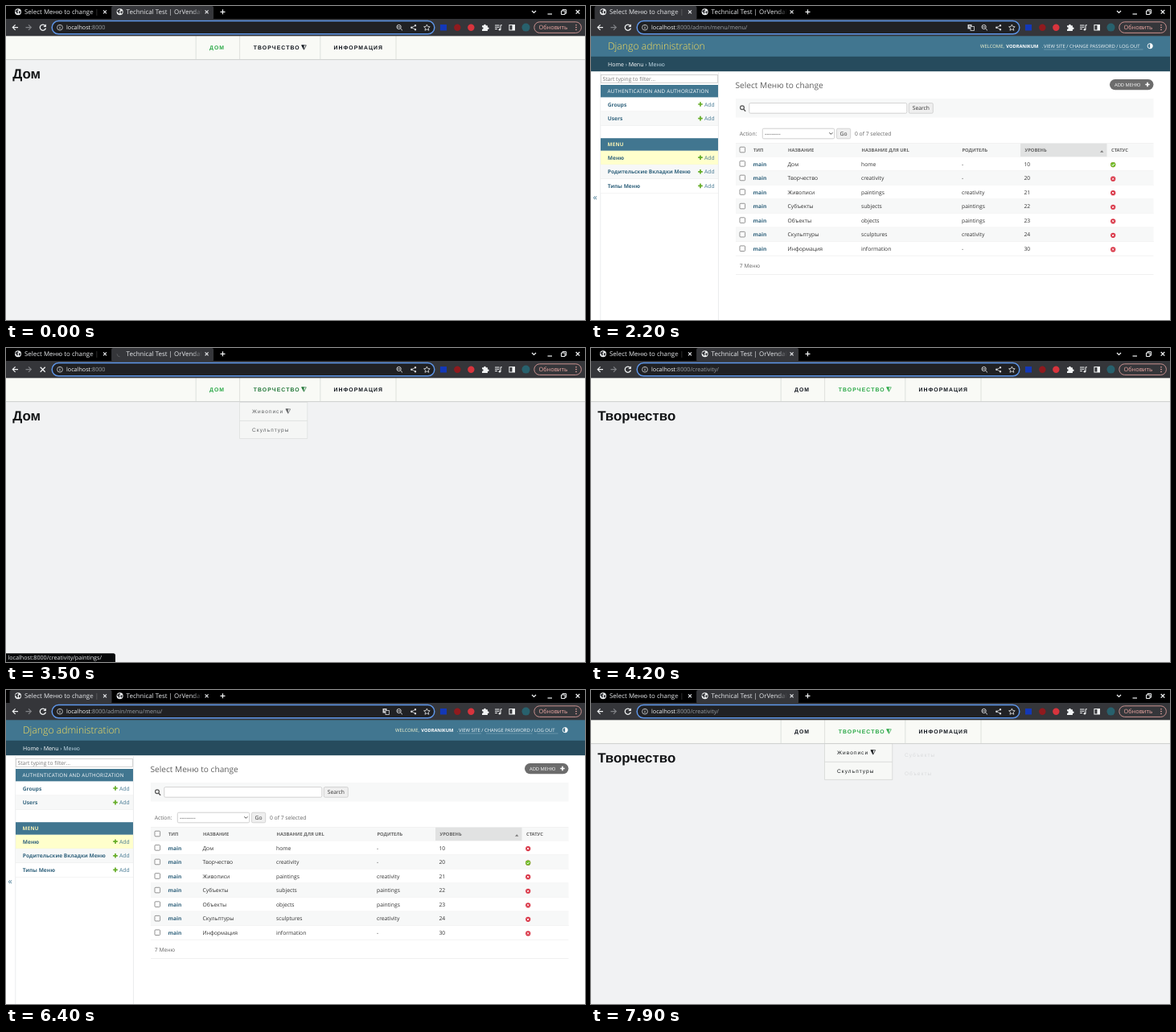
Write an HTML page that moves like this. It is 720 px wide and 390 px high and loops after 8000 ms.

```html
<!DOCTYPE html>
<html lang="ru">
<head>
<meta charset="utf-8">
<title>Menu demo</title>
<style>
html, body { margin: 0; width: 720px; height: 390px; overflow: hidden; background: #f1f2f3; }
svg { display: block; }
text { font-family: "Open Sans", "Noto Sans", sans-serif; text-rendering: geometricPrecision; white-space: pre; }
.site text { font-family: "Liberation Sans", Arial, sans-serif; }
.nav text { font-size: 6.85px; font-weight: 700; letter-spacing: 1.054px; }
.drop text { font-size: 6.5px; letter-spacing: 1.05px; }
</style>
</head>
<body>
<svg id="stage" width="720" height="390" viewBox="0 0 720 390"></svg>
<script>
const LOOP = 8000, GREEN = [40, 167, 69], INK = [15, 20, 28];
const stage = document.getElementById('stage');

const text = (x, y, size, str, fill, attrs = '') =>
  `<text x="${x}" y="${y}" font-size="${size}" fill="${fill}" ${attrs}>${str}</text>`;
const rect = (x, y, w, h, fill, attrs = '') =>
  `<rect x="${x}" y="${y}" width="${w}" height="${h}" fill="${fill}" ${attrs}/>`;
const line = (d, color, w = 1, fill = 'none') =>
  `<path d="${d}" stroke="${color}" stroke-width="${w}" fill="${fill}"/>`;
const fill = (d, color) => `<path d="${d}" fill="${color}"/>`;
const dot = (x, y, r, color, attrs = '') => `<circle cx="${x}" cy="${y}" r="${r}" fill="${color}" ${attrs}/>`;
const group = (id, body, attrs = '') => `<g id="${id}" ${attrs}>${body}</g>`;
const cross = (x, y, r, color, w) =>
  line(`M${x - r} ${y - r}l${2 * r} ${2 * r}m0 ${-2 * r}l${-2 * r} ${2 * r}`, color, w);
const plus = (x, y, r, color, w) => line(`M${x - r} ${y}h${2 * r}M${x} ${y - r}v${2 * r}`, color, w);
const BOLD = 'font-weight="700"';

// Browser window
function tab(id, x, title) {
  return `<g transform="translate(${x})">` +
    rect(4.5, 0, 127, 17, '#35363a', `id="${id}Bg" rx="2"`) +
    group(id + 'Icon', dot(15, 7.2, 4, '#f1f3f4') +
      fill('M12.2 5.2l2.6-1.2.8 1.2-1.3 1.5.8 1.2-1.2 2.2-1-2-1.6-1.3zM16 6.6l2-.4.2 2-1.6 1.6-.8-1.6z', '#35363a')) +
    group(id + 'Spin', line('M15 3.6a3.6 3.6 0 0 1 3.6 3.6', '#55575b', 1)) +
    text(23, 10, 7.95, title, '#e8eaed', 'mask="url(#fadeEnd)"') +
    cross(123, 7.3, 2, '#e8eaed', 1.1) + '</g>';
}

function chrome() {
  const icon = '#d5d7da', white = '#f1f3f4';
  return rect(0, 0, 720, 17, '#000') +
    tab('admin', 0, 'Select Меню to change | Django site admin') +
    tab('site', 126.6, 'Technical Test | OrVendal') +
    plus(269.5, 7.3, 3, white, 1.2) +
    line('M654 6l2.5 2.5L659 6', white, 1.2) + line('M673.5 10h5.5', white, 1.2) +
    line('M690.5 6h4.5v4.5h-4.5zM692 6V4.6h4.6v4.6H695', white) + cross(711, 7.3, 2.3, white, 1.3) +
    rect(0, 16, 720, 21.3, '#35363a') +
    line('M15 26.6H8.5M11.6 23.3l-3.3 3.3 3.3 3.3', white, 1.2) +
    line('M24.5 26.6H31M28 23.3l3.3 3.3-3.3 3.3', '#808286', 1.2) +
    group('reload', line('M48.7 24.4A3.6 3.6 0 1 0 49.4 27.5', white, 1.3) + fill('M49.9 22.5v3.6h-3.6z', white)) +
    group('stop', cross(45.7, 26.7, 3, white, 1.3)) +
    rect(57.2, 18.6, 475.6, 16.2, '#202124', 'rx="8.1" stroke="#5f97ea" stroke-width="1.5"') +
    dot(67, 26.7, 3.4, 'none', `stroke="${icon}" stroke-width=".8"`) + line('M67 26v2.6M67 24.5v.9', icon, .9) +
    `<text x="75" y="29.2" font-size="7.2" fill="#9aa0a6"><tspan fill="#f1f3f4">localhost</tspan><tspan id="path"></tspan></text>` +
    group('translate', rect(468.5, 23, 5, 5.5, icon) + rect(472, 25.5, 4.5, 5, '#202124', `stroke="${icon}" stroke-width=".8"`) +
      line('M470 25h2.2M471 24v3', '#202124', .6)) +
    dot(488.6, 26, 2.6, 'none', `stroke="${icon}"`) + line('M490.6 28l2.4 2.4M487.2 26h2.8', icon) +
    line('M509 24.3l-4.6 2.4 4.6 2.5', icon, .8) +
    dot(509, 24.2, 1.2, icon) + dot(504.3, 26.7, 1.2, icon) + dot(509, 29.3, 1.2, icon) +
    line('M523.4 23l1.1 2.5 2.7.3-2 1.8.6 2.7-2.4-1.4-2.4 1.4.6-2.7-2-1.8 2.7-.3z', icon, .9) +
    rect(540, 23, 8, 7.5, '#1338b8') + dot(561.3, 26.8, 4.2, '#901a1e') + dot(578.3, 26.8, 4.2, '#d8343d') +
    fill('M592 24.3h2.2a1.3 1.3 0 1 1 2.5 0h2.2v2.2a1.3 1.3 0 1 1 0 2.5v2H592v-2.3a1.2 1.2 0 1 0 0-2.3z', white) +
    line('M608 24h5.5M608 26.3h5.5M608 28.6h3M615 29.3V23.8h1.8', white, 1) + dot(613.9, 29.3, 1.3, white) +
    rect(625.9, 23.6, 6.6, 6.4, 'none', `stroke="${white}"`) + rect(629.4, 23.6, 3.3, 6.4, white) +
    dot(646.5, 26.6, 5, '#28616d') +
    rect(656.8, 19.8, 58.6, 13.6, 'none', 'rx="6.8" stroke="#d99a98" stroke-width=".9"') +
    text(662.5, 29.3, 7.35, 'Обновить', '#f0aaa5') +
    [23.7, 26.6, 29.5].map(y => dot(709, y, .8, '#f0aaa5')).join('');
}

// Public site
const arrow = (x, y) => line(`M${x} ${y}h5.6l-2.8 5.4z`, 'currentColor', .7) +
  fill(`M${x - .4} ${y - .3}h3.2v6z`, 'currentColor');

function site() {
  const border = '#d5d7d5', panel = '#f7f8f6';
  const box = (x, w) => rect(x, 66.3, w, 45, panel, `stroke="${border}" stroke-width=".8"`) +
    line(`M${x} 89.3h${w}`, border, .8);
  return rect(0, 37, 720, 353, '#f1f2f3') +
    text(8.2, 90.2, 16.87, '', '#111315', `id="heading" ${BOLD}`) +
    group('drop', box(290.6, 84.2) + text(306, 79.9, 6.5, 'Живописи', 'currentColor') + arrow(348, 74.7) +
      text(306, 102.6, 6.5, 'Скульптуры', 'currentColor'), 'class="drop" color="#15181b"') +
    group('sub', text(390, 79.9, 6.5, 'Субъекты', '#15181b') +
      text(390, 102.6, 6.5, 'Объекты', '#15181b'), 'class="drop"') +
    '<g class="nav">' + rect(0, 37, 720, 29.4, '#f9faf6') + rect(0, 66.2, 720, .9, '#c9cbca') +
    line('M236.2 37v29.2M290.6 37v29.2M390.8 37v29.2M485 37v29.2', '#d9dbd7', .8) +
    text(253, 54, 6.85, 'ДОМ', 'currentColor', 'id="home"') +
    group('creative', text(307.8, 54, 6.85, 'ТВОРЧЕСТВО', 'currentColor') + arrow(367.7, 48.8)) +
    text(407.5, 54, 6.85, 'ИНФОРМАЦИЯ', '#0f141c') + '</g>';
}

// Admin list page
const ROWS = [
  ['Дом', 'home', '-', 10], ['Творчество', 'creativity', '-', 20],
  ['Живописи', 'paintings', 'creativity', 21], ['Субъекты', 'subjects', 'paintings', 22],
  ['Объекты', 'objects', 'paintings', 23], ['Скульптуры', 'sculptures', 'creativity', 24],
  ['Информация', 'information', '-', 30]];
const STEP = 17.55;

function sideRow(y, name, bg) {
  return rect(12, y, 146, 17.5, bg) + rect(12, y + 17, 146, .5, '#e8e8e8') +
    text(20.8, y + 11, 6.6, name, '#34657f', BOLD) +
    plus(136, y + 8.4, 2.8, '#65ad27', 1.7) + text(141, y + 11, 6.75, 'Add', '#417690');
}

function admin() {
  const teal = '#417690', gray = '#666', tint = '#f7f8f8', rule = '#e6e6e6';
  const caption = (y, str, color, attrs = '') => rect(12, y, 146, 15.6, teal) +
    text(20.5, y + 10.1, 6.25, str, color, 'letter-spacing=".27" ' + attrs);
  const check = y => rect(185, y - 3.4, 6.6, 6.6, '#fff', 'rx="1" stroke="#777" stroke-width=".8"');
  const button = (x, y, w, str) => rect(x, y, w, 12.6, '#efefef', 'rx="1.5" stroke="#c4c4c4" stroke-width=".7"') +
    text(x + w / 2, y + 8.8, 6.75, str, '#333', 'text-anchor="middle"');
  const heads = [[202, 'ТИП'], [245, 'НАЗВАНИЕ'], [336.5, 'НАЗВАНИЕ ДЛЯ URL'], [461.5, 'РОДИТЕЛЬ'], [539.5, 'УРОВЕНЬ'], [647, 'СТАТУС']];
  const rows = ROWS.map((row, i) => {
    const y = 187.5 + i * STEP, mid = y + 9;
    return rect(180, y, 519.5, STEP, i % 2 ? tint : '#fff') + rect(180, y + STEP - .5, 519.5, .5, rule) +
      check(mid - .5) + text(201.5, mid + 2.2, 6.6, 'main', '#34657f', BOLD) +
      row.map((cell, n) => text([244.5, 336, 461, 538.5][n], mid + 2.2, 6.75, cell, '#333')).join('') +
      dot(649.2, mid + .6, 3.1, '#d93445') + cross(649.2, mid + .6, 1.2, '#fff', 1);
  }).join('');
  return rect(0, 37, 720, 353, '#fff') + rect(0, 37, 720, 26, teal) + rect(0, 62.8, 720, 18.4, '#264b5d') +
    text(21, 54, 12.2, 'Django administration', '#f5dd5d', 'font-weight="300"') +
    text(484, 52, 5.9, 'WELCOME,', '#f4f4cf') + text(516.3, 52, 5.7, 'VODRANIKUM', '#fff', BOLD) +
    text(560.5, 52, 5.9, '.', '#f4f4cf') + text(563, 52, 5.9, 'VIEW SITE / CHANGE PASSWORD / LOG OUT', '#f4f8fa') +
    line('M563 54h28M597 54h57.5M660.5 54h26', '#8fb0c0', .5) +
    dot(695.2, 49.7, 3.1, 'none', 'stroke="#fff" stroke-width=".9"') + fill('M695.2 46.6a3.1 3.1 0 0 1 0 6.2z', '#fff') +
    text(21, 74.7, 7, 'Home<tspan fill="#c4dce8"> › </tspan>Menu<tspan fill="#c4dce8"> › Меню</tspan>', '#fff') +
    rect(11.5, 81.2, .7, 309, '#e2e4e5') + rect(158, 81.2, .7, 309, '#e2e4e5') +
    text(2.4, 240.5, 10.5, '«', teal) +
    rect(12.4, 85.4, 145.2, 10, '#fff', 'stroke="#c9c9c9" stroke-width=".8"') +
    text(14.5, 92.8, 6.7, 'Start typing to filter…', '#777') +
    caption(98, 'AUTHENTICATION AND AUTHORIZATION', '#fff') +
    sideRow(113.6, 'Groups', '#fff') + sideRow(131.2, 'Users', tint) +
    caption(164.2, 'MENU', '#f8f2b4', BOLD) +
    sideRow(179.8, 'Меню', '#ffffcc') + sideRow(197.4, 'Родительские Вкладки Меню', tint) + sideRow(215, 'Типы Меню', '#fff') +
    text(179.5, 102, 10.15, 'Select Меню to change', '#606060') +
    rect(645, 91, 54.5, 13.2, '#6c6c6c', 'rx="6.6"') +
    text(651, 99.8, 5.75, 'ADD МЕНЮ', '#fff') + plus(692, 97.5, 2.7, '#fff', 1.6) +
    rect(180, 115, 519.5, 23.5, tint) +
    dot(188, 126.3, 2.4, 'none', 'stroke="#555" stroke-width="1.2"') + line('M189.8 128.2l2.4 2.5', '#555', 1.4) +
    rect(196.8, 120.6, 196, 12.6, '#fff', 'rx="1.5" stroke="#c8c8c8" stroke-width=".8"') +
    button(395.3, 120.6, 30, 'Search') +
    text(184.8, 160.7, 6.75, 'Action:', gray) +
    rect(213.3, 152.2, 89.4, 12.6, '#fff', 'rx="1.5" stroke="#c4c4c4" stroke-width=".8"') +
    text(216, 160.6, 6.75, '---------', '#333') + line('M296.4 157.3l2 2 2-2', '#444', 1) +
    button(305.5, 152.2, 17.2, 'Go') + text(328, 160.7, 6.75, '0 of 7 selected', gray) +
    rect(180, 170.7, 519.5, 16.8, tint) + rect(534, 170.7, 107.5, 16.8, '#e1e2e2') +
    rect(180, 170.5, 519.5, .5, rule) + rect(180, 187, 519.5, .5, rule) + check(178.6) +
    heads.map(([x, str]) => text(x, 181.1, 5.75, str, gray, BOLD)).join('') +
    fill('M633 181.8l2.2-2.6 2.2 2.6z', '#777') + rows +
    group('ok', dot(649.2, 197.1, 3.1, '#70bf2b') + line('M647.6 197.1l1.2 1.3 2.1-2.4', '#fff', 1)) +
    text(184.8, 325, 6.75, '7 Меню', gray) + rect(180, 333, 519.5, .6, rule);
}

stage.innerHTML = `<defs><linearGradient id="ramp" gradientUnits="userSpaceOnUse" x1="105" x2="117" y1="0" y2="0">
  <stop stop-color="#fff"/><stop offset="1" stop-color="#000"/></linearGradient>
  <mask id="fadeEnd" maskUnits="userSpaceOnUse" x="0" y="0" width="118" height="17">${rect(0, 0, 118, 17, 'url(#ramp)')}</mask></defs>` +
  group('sitePage', site(), 'class="site"') + group('adminPage', admin()) + chrome() +
  group('status', fill('M0 379.2h133.5q2.5 0 2.5 2.5V390H0z', '#08090a') +
    text(2.5, 387.4, 7.15, 'localhost:8000/creativity/paintings/', '#e8eaed'));

const el = {};
stage.querySelectorAll('[id]').forEach(node => el[node.id] = node);
const show = (id, on) => el[id].setAttribute('visibility', on ? 'visible' : 'hidden');
const within = (t, a, b) => t >= a && t < b;
const clamp = v => Math.max(0, Math.min(1, v));
// Hover transition: in from `on`, out from `off`
const fade = (t, on, off = Infinity) => clamp(Math.min(t - on, off + 300 - t) / 300);
const mix = k => `rgb(${INK.map((c, i) => Math.round(c + (GREEN[i] - c) * k))})`;

function slide(id, k) {
  el[id].setAttribute('opacity', k);
  el[id].setAttribute('transform', `translate(0 ${3.5 * (1 - k)})`);
}

function draw(t) {
  const onAdmin = within(t, 1600, 2500) || within(t, 5200, 7100);
  const creative = t >= 3700;
  const siteBusy = within(t, 3400, 3700);
  const adminBusy = within(t, 1900, 2100) || within(t, 5700, 6100);
  const open = Math.max(fade(t, 2800, 3400), fade(t, 7600));

  for (const [id, active, busy] of [['admin', onAdmin, adminBusy], ['site', !onAdmin, siteBusy]]) {
    el[id + 'Page'].style.display = active ? '' : 'none';
    show(id + 'Bg', active);
    show(id + 'Icon', !busy);
    show(id + 'Spin', busy);
    el[id + 'Spin'].setAttribute('transform', `rotate(${t * .36} 15 7.2)`);
  }
  show('stop', siteBusy || adminBusy);
  show('reload', !siteBusy && !adminBusy);
  show('translate', onAdmin);
  show('status', within(t, 3200, 3900));
  el.path.textContent = ':8000' + (onAdmin ? '/admin/menu/menu/' : creative ? '/creativity/' : '');

  el.heading.textContent = creative ? 'Творчество' : 'Дом';
  el.home.setAttribute('color', mix(creative ? 0 : 1));
  el.creative.setAttribute('color', mix(creative ? 1 : open));
  slide('drop', open);
  slide('sub', fade(t, 7870));
  el.ok.setAttribute('transform', `translate(0 ${t >= 6100 ? STEP : 0})`);
}

const start = performance.now();
function tick() {
  draw(Math.floor((performance.now() - start) % LOOP / 100) * 100);
  requestAnimationFrame(tick);
}
tick();
</script>
</body>
</html>
```
